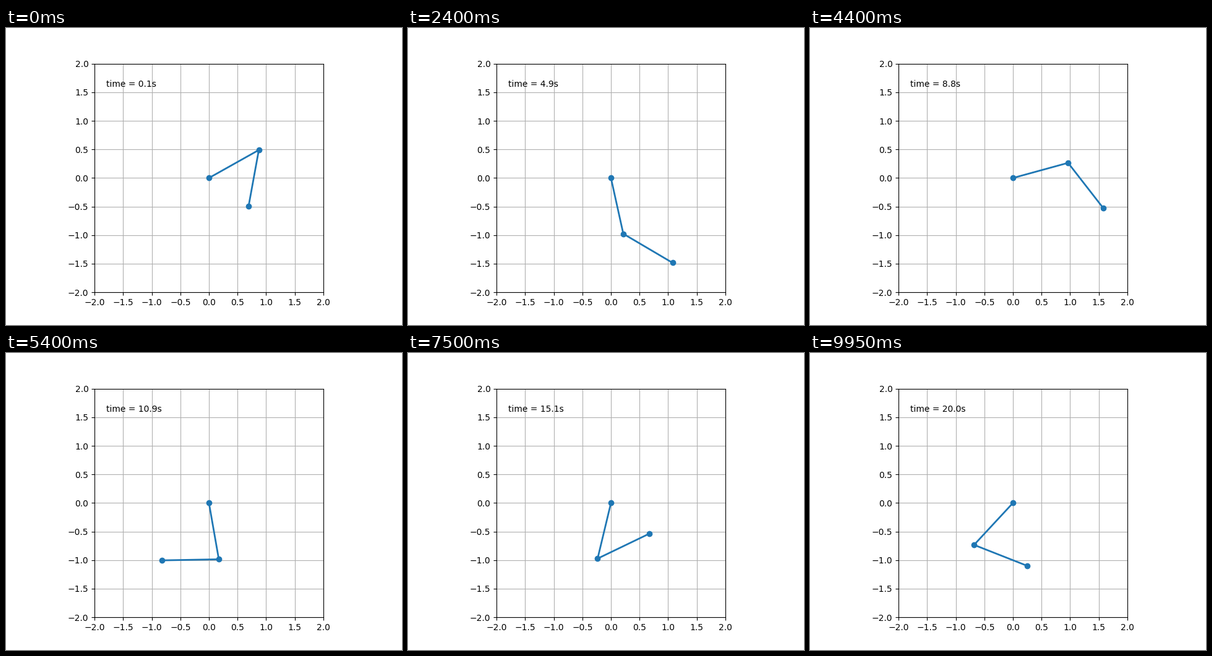
A matplotlib script that plays this animation: 640x480 px, repeating every 9.97 s.

```python
"""Double pendulum swinging freely, with a running clock."""
from math import cos, sin, radians

import matplotlib.pyplot as plt
import numpy as np
from matplotlib.animation import FuncAnimation

G = 9.8          # gravity; both rods and both masses are 1
DT = 0.05        # pendulum time between frames
STEPS = 399
SUBSTEPS = 50


def derivs(state):
    th1, w1, th2, w2 = state
    d = th2 - th1
    s, c = sin(d), cos(d)
    den = 2 - c * c
    a1 = (w1 * w1 * s * c + G * sin(th2) * c + w2 * w2 * s
          - 2 * G * sin(th1)) / den
    a2 = (-w2 * w2 * s * c + 2 * G * sin(th1) * c - 2 * w1 * w1 * s
          - 2 * G * sin(th2)) / den
    return w1, a1, w2, a2


def shifted(state, slope, h):
    return [v + h * k for v, k in zip(state, slope)]


def rk4(state, h):
    k1 = derivs(state)
    k2 = derivs(shifted(state, k1, h / 2))
    k3 = derivs(shifted(state, k2, h / 2))
    k4 = derivs(shifted(state, k3, h))
    mean = [(a + 2 * b + 2 * c + d) / 6 for a, b, c, d in zip(k1, k2, k3, k4)]
    return shifted(state, mean, h)


def swing():
    """Angles of both rods at every frame."""
    state = [radians(120), 0.0, radians(-10), 0.0]
    angles = []
    for _ in range(STEPS):
        for _ in range(SUBSTEPS):
            state = rk4(state, DT / SUBSTEPS)
        angles.append((state[0], state[2]))
    return np.array(angles).T


th1, th2 = swing()
x1, y1 = np.sin(th1), -np.cos(th1)
x2, y2 = x1 + np.sin(th2), y1 - np.cos(th2)

fig = plt.figure(figsize=(6.4, 4.8), dpi=100)
ax = fig.add_subplot(autoscale_on=False, xlim=(-2, 2), ylim=(-2, 2))
ax.set_aspect("equal")
ax.grid()
rods, = ax.plot([], [], "o-", lw=2)
clock = ax.text(0.05, 0.9, "", transform=ax.transAxes)


def draw(i):
    rods.set_data([0, x1[i], x2[i]], [0, y1[i], y2[i]])
    clock.set_text(f"time = {(i + 1) * DT:.1f}s")
    return rods, clock


anim = FuncAnimation(fig, draw, frames=STEPS, interval=25, repeat=True,
                     repeat_delay=0, init_func=lambda: draw(0))
plt.show()
```
